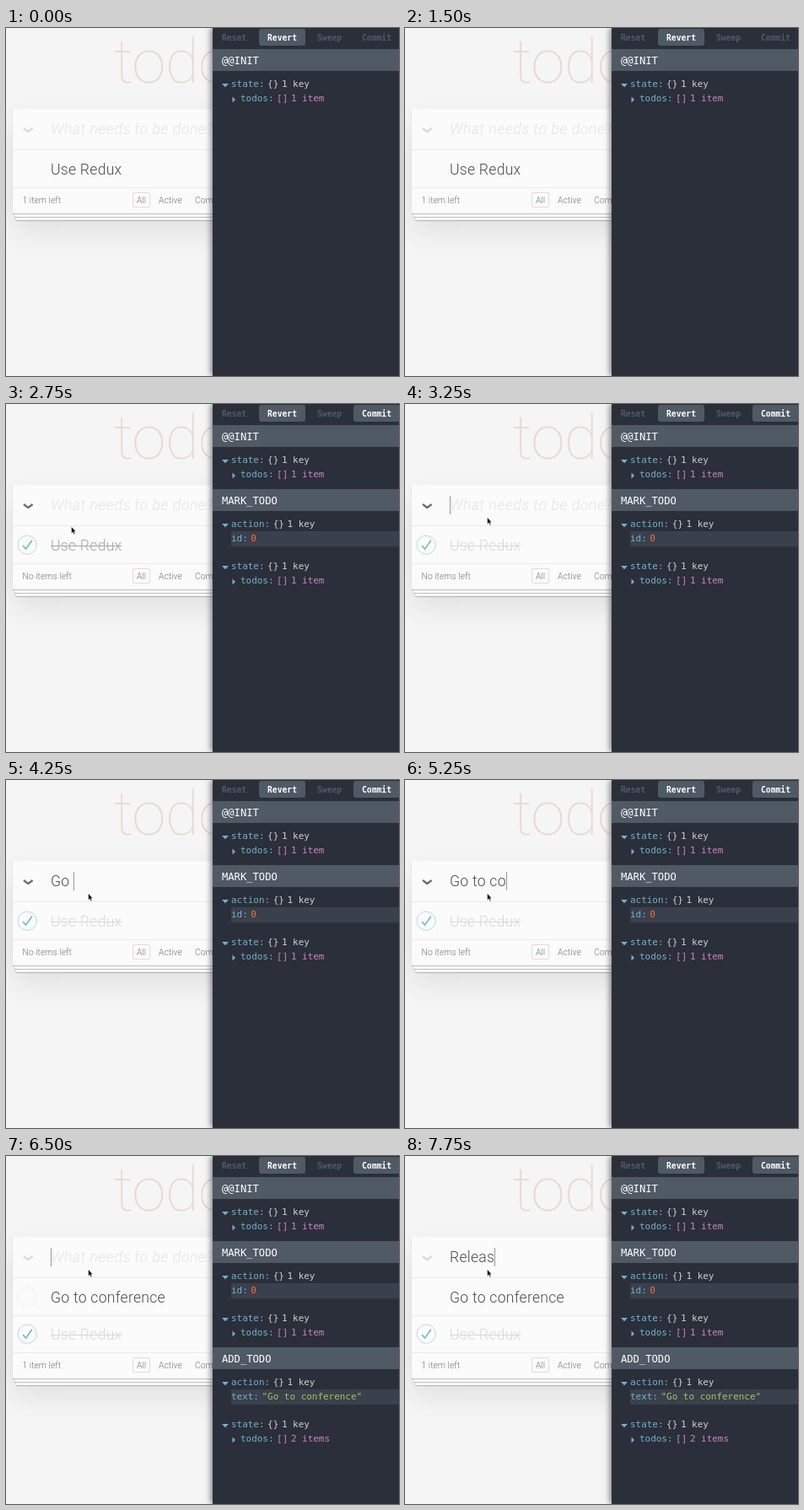
An HTML page that plays this animation: 466 px wide and 413 px high, repeating every 8000 ms.

```html
<!DOCTYPE html>
<html lang="en">
<head>
<meta charset="utf-8">
<title>Todo list with action log</title>
<style>
html, body { margin: 0; width: 100%; height: 100%; overflow: hidden; background: #f5f5f5; }
#stage { position: absolute; left: 0; top: 0; width: 466px; height: 413px; overflow: hidden; background: #f5f5f5; }
#stage div, #stage svg { position: absolute; }
.t { white-space: pre; font: 300 17.6px/20px Roboto, "Liberation Sans", sans-serif; letter-spacing: .25px; color: #4d4d4d; }
.title { font-size: 73px; font-weight: 100; letter-spacing: -.7px; color: #ead7d7; }
.hint { font-style: italic; letter-spacing: .6px; color: #e4e4e4; }
.small { font-size: 10.4px; letter-spacing: 0; color: #777; }
.card {
  left: 8px; top: 96px; width: 403px; background: #fbfbfb;
  box-shadow: 0 1px 1px rgba(0,0,0,.2), 0 6px 0 -2px #f8f8f8, 0 7px 1px -2px rgba(0,0,0,.2),
    0 12px 0 -4px #f8f8f8, 0 13px 1px -4px rgba(0,0,0,.2), 0 18px 37px rgba(0,0,0,.1);
}
.rule { left: 8px; width: 403px; height: 1px; background: #ebebeb; }
.pick { left: 150px; width: 19px; height: 16px; border: 1px solid #e4dada; border-radius: 2px; }
.caret { top: 109px; width: 1px; height: 22px; background: #999; }
.panel { left: 245px; top: 0; width: 221px; height: 413px; background: #2a2f3a; box-shadow: -2px 0 7px rgba(0,0,0,.5); }
.bar { left: 245px; width: 221px; height: 26px; background: #4f5a65; }
.field { left: 267px; width: 199px; height: 18px; background: #3a404c; }
.m { font: 10.95px/20px "DejaVu Sans Mono", monospace; white-space: pre; color: #6fb3d2; }
.m i { font-style: normal; margin-left: 3.6px; }
.head { font-size: 12.15px; color: #fff; }
.btn { font-size: 9.7px; font-weight: 700; color: #535a66; }
.btn.on { color: #fff; }
.key { background: #4f5a65; border-radius: 3px; height: 20px; top: 1px; }
</style>
</head>
<body>
<div id="stage"></div>
<script>
const stage = document.getElementById('stage');
const LOOP = 8000, MARK = 2750, ADD = 6500, ROW = 44;

function box(cls, style = {}, parent = stage) {
  const el = document.createElement('div');
  el.className = cls;
  for (const k in style) el.style[k] = style[k] + 'px';
  parent.append(el);
  return el;
}
// One line of text, centred on cy
function label(x, cy, html, cls = 't', parent = stage) {
  const el = box(cls, { left: x, top: cy - 10 }, parent);
  el.innerHTML = html;
  return el;
}
function svg(x, y, w, h, body) {
  const wrap = box('', { left: x, top: y });
  wrap.innerHTML = `<svg width="${w}" height="${h}" fill="none" style="left:0;top:0;overflow:visible">${body}</svg>`;
  return wrap;
}
const show = (el, on) => { el.style.visibility = on ? 'visible' : 'hidden'; };

// Todo page
label(127.7, 39.5, 'todos', 't title');
const card = box('card');
[144, 189].forEach(y => box('rule', { top: y }));
const addRule = box('rule', { top: 189 + ROW });
const hint = label(53, 120, 'What needs to be done?', 't hint');
const typed = label(53, 120, '');
const caret = box('caret');
const chevron = svg(20, 118, 13, 8, '<path d="M1 1 6.3 5 11.6 1" stroke="currentColor" stroke-width="2.2"/>');
const ring = svg(13, 155, 25, 25, '<circle cx="12.2" cy="12.2" r="11.1" stroke="#f0f0f0"/>');
const newItem = label(53, 168, 'Go to conference');
const oldItem = label(53, 168, 'Use Redux');
const check = svg(13, 155, 25, 25,
  '<circle cx="12.2" cy="12.2" r="11.1" stroke="#bddad5"/><path d="M7 13 10.6 17.1 17.8 6.8" stroke="#5dc2af" stroke-width="1.5"/>');
const foot = box('', { left: 0, top: 0 });
const count = label(19.5, 205, '', 't small', foot);
box('pick', { top: 195 }, foot);
[[155, 'All'], [181, 'Active'], [224, 'Completed']].forEach(([x, s]) => label(x, 205, s, 't small', foot));

// Action log
const COLORS = { plain: '#d0d0d0', list: '#d381c3', num: '#fc6d24', str: '#a1c659' };
const arrow = (x, cy, open) =>
  `<svg width="8" height="8" style="left:${x}px;top:${cy - 4}px"><path fill="#6fb3d2" d="${open ? 'M0 2H8L4 6.2Z' : 'M1.5 .6V7.4L5 4Z'}"/></svg>`;
function pair(parent, x, cy, key, kind, ...parts) {
  label(x, cy, key + ':' + parts.map(p => `<i style="color:${COLORS[kind]}">${p}</i>`).join(''), 'm', parent);
}
function branch(parent, x, cy, open, ...rest) {
  parent.insertAdjacentHTML('beforeend', arrow(x - 11, cy + 1, open));
  pair(parent, x, cy, ...rest);
}
function entry(y, name, items, field) {
  const g = box('', { left: 0, top: 0 });
  box('bar', { top: y }, g);
  label(256, y + 14, name, 'm head', g);
  let cy = y + 42;
  if (field) {
    branch(g, 267, cy, true, 'action', 'plain', '{}', '1 key');
    box('field', { top: cy + 8 }, g);
    pair(g, 267, cy + 17, ...field);
    cy += 50;
  }
  branch(g, 267, cy, true, 'state', 'plain', '{}', '1 key');
  branch(g, 278, cy + 17, false, 'todos', 'list', '[]', items);
  return g;
}
box('panel');
box('key', { left: 300, width: 55 });
const commitKey = box('key', { left: 412, width: 55 });
const [, , , commit] = [[256, 'Reset'], [310, 'Revert'], [369, 'Sweep'], [422, 'Commit']].map(
  ([x, s]) => label(x, 11.5, s, 'm btn' + (s === 'Revert' ? ' on' : '')));
entry(25, '@@INIT', '1 item');
const marked = entry(101, 'MARK_TODO', '1 item', ['id', 'num', '0']);
const added = entry(227, 'ADD_TODO', '2 items', ['text', 'str', '"Go to conference"']);

const pointer = svg(0, 0, 8, 12,
  '<path d="M.5 .5V8.6L2.3 7 3.5 9.8 4.9 9.2 3.8 6.5H6Z" fill="#111" stroke="#fff" stroke-width=".5"/>');

// Steps: [ms, value]
const TYPING = [
  [0, ''], [3750, 'G'], [4250, 'Go '], [4500, 'Go to'], [5000, 'Go to '], [5250, 'Go to co'],
  [5500, 'Go to conf'], [5750, 'Go to confere'], [6000, 'Go to conferen'], [6250, 'Go to conference'],
  [6500, ''], [7000, 'Re'], [7250, 'Rel'], [7500, 'Relea'], [7750, 'Releas']
];
const CARET = [[0, 0], [1000, 1], [1500, 0], [2000, 1], [2500, 0], [3250, 1]];
const POINTER = [
  [0, null], [500, [186, 118]], [750, [171, 118]], [1000, null], [2000, [117, 138]],
  [2250, [26, 176]], [2500, [21, 175]], [2750, [77, 145]], [3000, [97, 134]]
];
const step = (table, t) => table.reduce((v, s) => (t >= s[0] ? s[1] : v), null);

function draw(t) {
  const done = t >= MARK, more = t >= ADD, shift = more ? ROW : 0;

  const text = step(TYPING, t);
  if (typed.textContent !== text) typed.textContent = text;
  show(hint, !text);
  show(caret, step(CARET, t));
  caret.style.left = 53 + typed.getBoundingClientRect().width + 'px';

  card.style.height = 124 + shift + 'px';
  foot.style.top = shift + 'px';
  oldItem.style.top = 158 + shift + 'px';
  oldItem.style.color = t < MARK ? '#4d4d4d' : t < 3000 ? '#a6a6a6' : '#d9d9d9';
  oldItem.style.textDecoration = done ? 'line-through 1px' : 'none';
  check.style.top = 155 + shift + 'px';
  chevron.style.color = done && !more ? '#6c6c6c' : '#dadada';
  count.textContent = done && !more ? 'No items left' : '1 item left';
  show(check, done);
  show(ring, (t >= 2250 && !done) || (more && t < 7500));
  show(newItem, more);
  show(addRule, more);

  show(marked, done);
  show(added, more);
  show(commitKey, done);
  commit.classList.toggle('on', done);

  const p = step(POINTER, t);
  show(pointer, p);
  if (p) pointer.style.transform = `translate(${p[0]}px, ${p[1]}px)`;
}

const start = performance.now();
function tick() {
  draw((performance.now() - start) % LOOP);
  requestAnimationFrame(tick);
}
tick();
</script>
</body>
</html>
```
